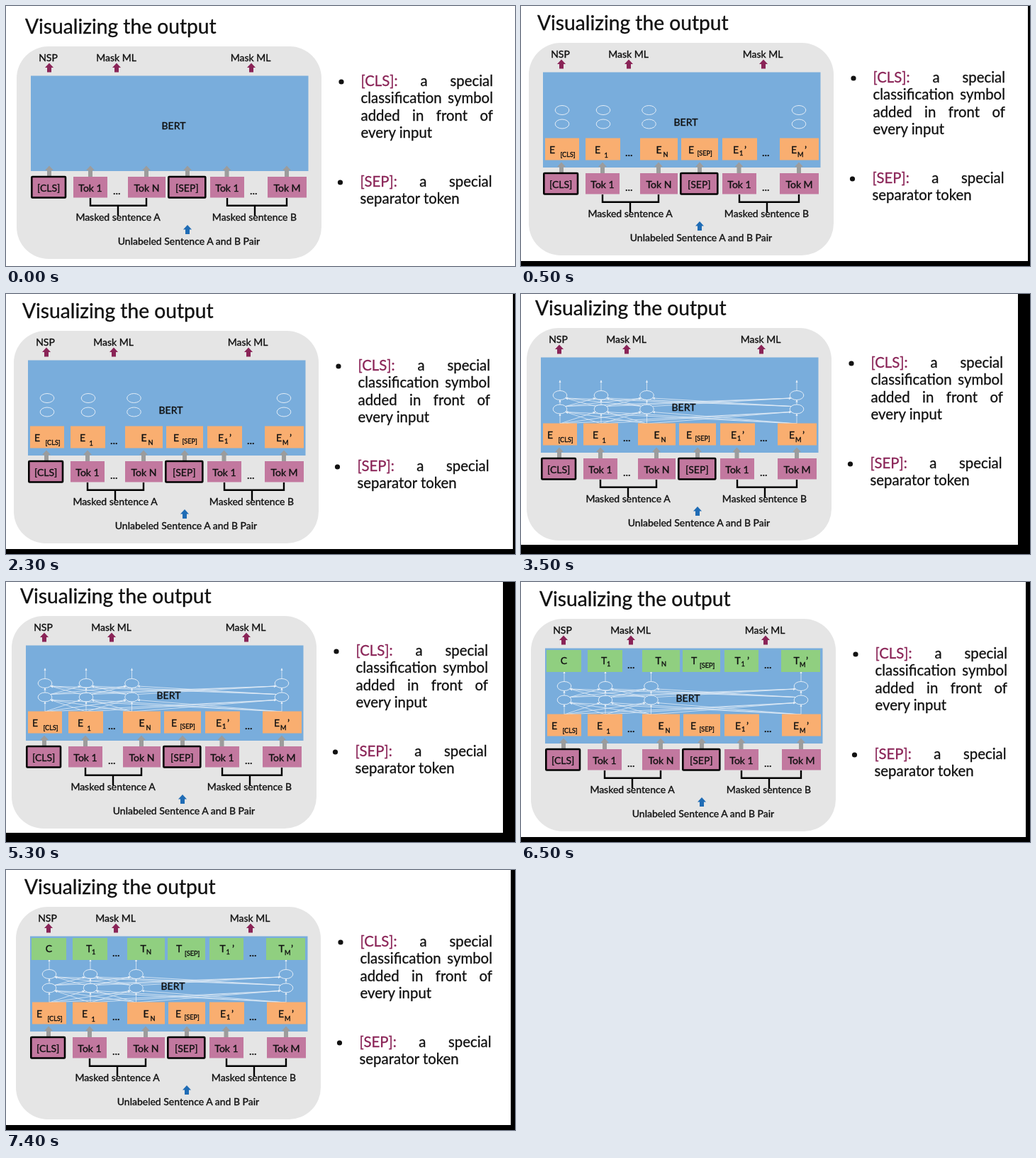
Recreate the animation shown at these times as an HTML page. Size 718 by 367 pixels, loop 8 s.

```html
<!DOCTYPE html>
<html>
<head>
<meta charset="utf-8">
<style>
html, body { margin: 0; width: 100%; height: 100%; overflow: hidden; background: #fff; }
#slide { position: absolute; left: 0; top: 0; width: 718px; height: 367px; color: #111; font-family: Lato, sans-serif; }
svg { position: absolute; left: 0; top: 0; overflow: visible; }
text { fill: #111; stroke: #111; stroke-width: 0.35px; }
p { position: absolute; margin: 0; font-size: 20.4px; line-height: 24.5px; text-align: justify; -webkit-text-stroke: 0.3px; }
b { font-weight: 400; color: #8a2457; }
#frame { position: absolute; left: 0; top: 0; box-shadow: 0 0 0 400px #000; }
</style>
</head>
<body>
<div id="slide">
  <svg id="svg" width="718" height="367">
    <defs>
      <marker id="tip" viewBox="0 0 6 6" refX="5" refY="3" markerWidth="5" markerHeight="5" orient="auto">
        <path d="M0 0.5L6 3L0 5.5z" fill="#e3edf7"/>
      </marker>
    </defs>
  </svg>
  <p style="left:500.5px;top:92.5px;width:186.5px"><b>[CLS]:</b> a special classification symbol added in front of every input</p>
  <p style="left:499.5px;top:234.5px;width:186px"><b>[SEP]:</b> a special separator token</p>
</div>
<div id="frame"></div>
<script>
const svg = document.getElementById('svg');
const slide = document.getElementById('slide');
const frame = document.getElementById('frame');

function add(parent, tag, attrs, text = '') {
  const el = document.createElementNS('http://www.w3.org/2000/svg', tag);
  for (const key in attrs) el.setAttribute(key, attrs[key]);
  el.textContent = text;
  return parent.appendChild(el);
}
const group = () => add(svg, 'g', {});
const rect = (g, x, y, width, height, fill, more) => add(g, 'rect', { x, y, width, height, fill, ...more });
const label = (g, x, y, text, size = 14, anchor = 'start') =>
  add(g, 'text', { x, y, 'font-size': size, 'text-anchor': anchor }, text);
const centered = (g, x, y, text) => label(g, x, y, text, 14, 'middle');
const arrow = (g, x, y, height, fill) =>
  add(g, 'path', { d: `M${x} ${y}l6 6.5h-3v${height - 6.5}h-6v${6.5 - height}h-3z`, fill });
const dots = (g, y) => [151, 344].forEach(x => label(g, x, y, '...', 15));

const base = group(), nodes = group(), links = group(), inputs = group(), outputs = group(), front = group();

// Panel, title, headings
label(base, 27, 39, 'Visualizing the output', 28.2);
rect(base, 15, 57, 430, 300, '#e5e5e5', { rx: 45 });
rect(base, 35, 98.5, 391.5, 134.5, '#79addc');
centered(base, 59.5, 78, 'NSP');
centered(base, 155.5, 78, 'Mask ML');
centered(base, 345, 78, 'Mask ML');
[61, 156, 346].forEach(x => arrow(base, x, 80.5, 13, '#8a2457'));
add(base, 'circle', { cx: 473, cy: 107, r: 3.6, fill: '#111' });
add(base, 'circle', { cx: 471.5, cy: 249, r: 3.6, fill: '#111' });

// Token row
const tokens = [
  ['[CLS]', 36.3, 47.7, true], ['Tok 1', 95, 48], ['Tok N', 172, 53],
  ['[SEP]', 229.3, 52, true], ['Tok 1', 288, 48], ['Tok M', 369, 55]
];
[61, 119, 198, 256, 311.5, 396].forEach(x => arrow(base, x, 225.5, 15.5, '#9c9c9c'));
tokens.forEach(([text, x, w, outlined]) => {
  rect(base, x, 241, w, 29.5, '#c2789f', outlined ? { stroke: '#000', 'stroke-width': 2.6, rx: 1 } : {});
  centered(base, x + w / 2, 262, text);
});
dots(base, 265.5);
add(base, 'path', {
  d: 'M119 271V281.7H198V271M158 281.7V296M312 271V281.7H396V271M351 281.7V296',
  fill: 'none', stroke: '#000', 'stroke-width': 2.4
});
centered(base, 158, 303, 'Masked sentence A');
centered(base, 350.5, 303, 'Masked sentence B');
arrow(base, 256, 309, 13, '#1f6cb5');
centered(base, 258, 337, 'Unlabeled Sentence A and B Pair');

// Hidden layers: every node links to every node above it
const columns = [62, 120, 184.5, 396];
const line = (x1, y1, x2, y2) =>
  add(links, 'line', { x1, y1, x2, y2, stroke: '#e3edf7', 'stroke-width': 0.8, 'marker-end': 'url(#tip)' });
columns.forEach(x => {
  for (const cy of [152, 171.5])
    add(nodes, 'ellipse', { cx: x, cy, rx: 9.8, ry: 6.5, fill: 'none', stroke: '#e3edf7', 'stroke-width': 1 });
  columns.forEach(to => {
    const side = 8 * Math.sign(x - to);
    line(x, 192, to + side, side ? 175.5 : 178);
    line(x - side, side ? 167.5 : 165, to + side, side ? 156 : 158.5);
  });
  line(x, 145.5, x, 131);
});

// Row of boxes: [x, width, letter x, subscript, subscript x, subscript y, prime x]
function boxes(g, y, fill, letter, letterY, cells) {
  cells.forEach(([x, w, lx, sub, sx, sy, prime]) => {
    rect(g, x, y, w, 31, fill);
    label(g, lx, letterY, letter);
    label(g, sx, sy, sub, 9.2);
    if (prime) label(g, prime, letterY, '’');
  });
}
boxes(inputs, 191.5, '#f9ae70', 'E', 213, [
  [38, 48, 44, '[CLS]', 59.5, 218], [95, 49, 108, '1', 121.5, 219], [172, 53, 194.5, 'N', 204.5, 218],
  [230, 52, 240, '[SEP]', 252.5, 215.5], [288, 49, 303, '1', 312, 215.5, 319], [369, 55, 385, 'M', 394, 217.5, 404]
]);
dots(inputs, 216.5);
boxes(outputs, 101, '#90cf80', 'T', 121, [
  [95, 49, 114, '1', 122, 123.5], [172, 53, 190.5, 'N', 199, 123.5],
  [229, 53, 241, '[SEP]', 253, 126], [288, 48, 302.5, '1', 311.5, 123.5, 320], [368, 55, 385.5, 'M', 394, 125, 403]
]);
rect(outputs, 37, 101, 49, 31, '#90cf80');
centered(outputs, 61.5, 121, 'C');
dots(outputs, 127);
centered(front, 236.5, 173.5, 'BERT');

// Each stage: start time, slide offset, visible area
const stages = [
  [0, 0, 0, 718, 367], [500, -4, -5, 715, 360], [3500, -7, -9, 701, 354], [6500, -1, -5, 712, 360]
];
const firstStage = [[nodes, 1], [inputs, 1], [links, 2], [outputs, 3]];

function draw() {
  const t = performance.now() % 8000;
  const stage = stages.filter(s => s[0] <= t).length - 1;
  const [, dx, dy, width, height] = stages[stage];
  slide.style.transform = `translate(${dx}px, ${dy}px)`;
  frame.style.width = width + 'px';
  frame.style.height = height + 'px';
  firstStage.forEach(([g, from]) => g.setAttribute('display', stage >= from ? 'inline' : 'none'));
  requestAnimationFrame(draw);
}
draw();
</script>
</body>
</html>
```
